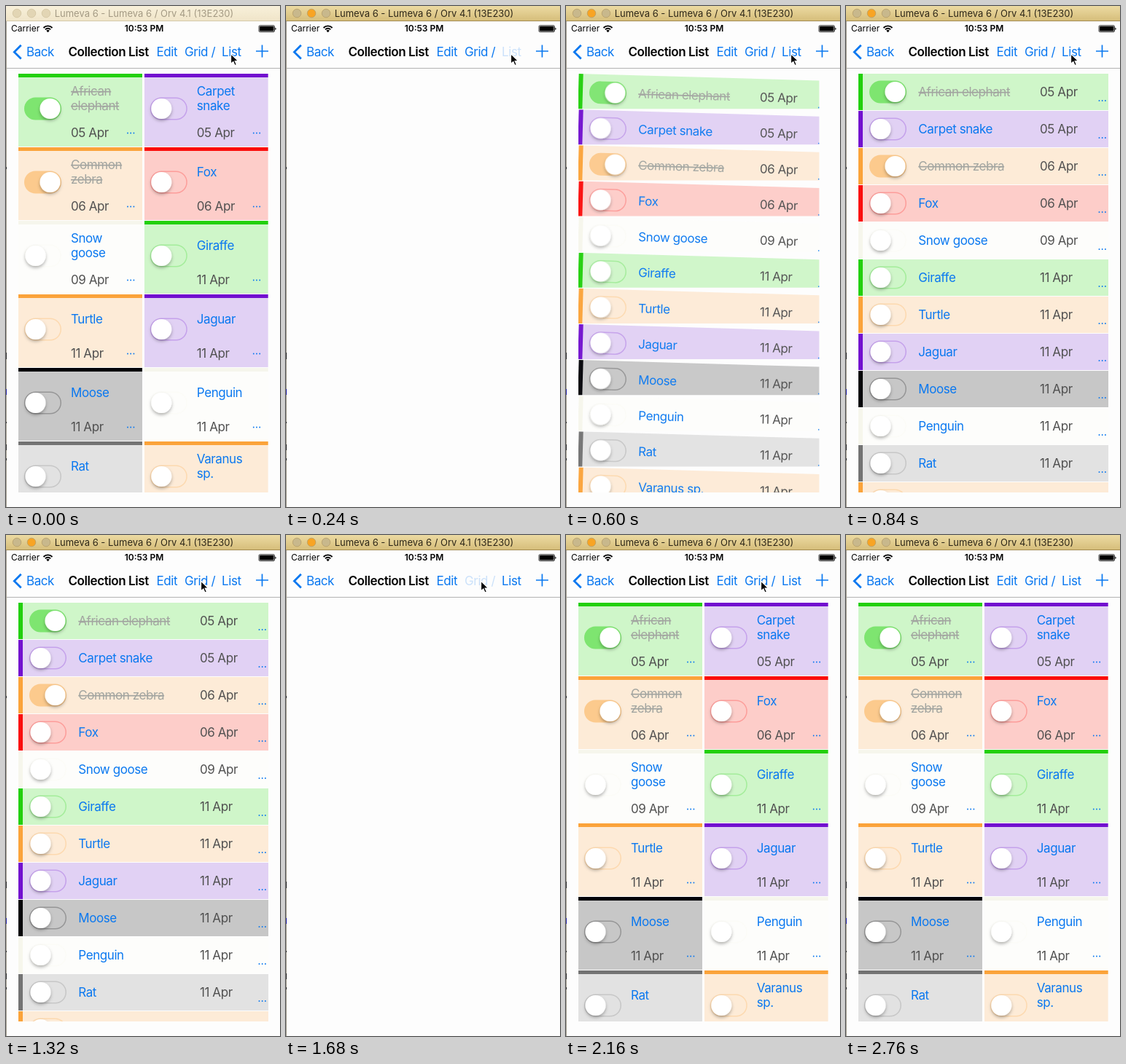
Animation of 376 by 688 pixels, one loop 2880 ms. Source, as an HTML page:

```html
<!DOCTYPE html>
<html lang="en">
<head>
<meta charset="utf-8">
<title>Collection List</title>
<style>
  html, body { margin: 0; width: 100%; height: 100%; overflow: hidden; background: #fdfdfd; }
  svg.stage { display: block; width: 100vw; height: 100vh; }
  text { font: 17px Inter, "Liberation Sans", sans-serif; letter-spacing: -0.42px; white-space: pre; }
  .link { fill: #0a78f0; }
  .date { fill: #505050; }
  .done { fill: #a2a5a0; text-decoration: line-through; }
  .heading { font-weight: 600; fill: #000; }
  .status { font-size: 12px; letter-spacing: 0; }
  .clock { font-weight: 600; text-anchor: middle; }
  .window { font-size: 13px; letter-spacing: 0; text-anchor: middle; }
</style>
</head>
<body>
<svg class="stage" viewBox="0 0 376 688" xmlns="http://www.w3.org/2000/svg">
  <defs>
    <linearGradient id="activeBar" x2="0" y2="1">
      <stop stop-color="#ecdaa2"/><stop offset="1" stop-color="#d6be7b"/>
    </linearGradient>
    <linearGradient id="idleBar" x2="0" y2="1">
      <stop stop-color="#f8f0da"/><stop offset="1" stop-color="#f0e5c9"/>
    </linearGradient>
    <filter id="shadow" x="-40%" y="-40%" width="180%" height="200%">
      <feDropShadow dx="0" dy="2.5" stdDeviation="2" flood-opacity=".3"/>
    </filter>
    <clipPath id="viewport"><rect y="86" width="376" height="582"/></clipPath>
  </defs>

  <rect width="376" height="688" fill="#fdfdfd"/>
  <rect y="20" width="1" height="668" fill="#aaa597"/>
  <g fill="#333">
    <rect y="221" width="1" height="3"/><rect y="476" width="1" height="9"/>
    <rect y="526" width="1" height="8" fill="#2b2bb0"/>
    <rect y="571" width="1" height="2"/><rect y="602" width="1" height="8"/><rect y="621" width="1" height="3"/>
  </g>

  <rect id="bar" width="376" height="20"/>
  <rect id="barEdge" y="20" width="376" height="1"/>
  <g id="lights" stroke-width=".7">
    <circle cx="15" cy="10" r="5.8"/><circle cx="35" cy="10" r="5.8"/><circle cx="55" cy="10" r="5.8"/>
  </g>
  <text id="windowTitle" class="window" x="189.5" y="15">Lumeva 6 - Lumeva 6 / Orv 4.1 (13E230)</text>

  <text class="status" x="7" y="35.3">Carrier</text>
  <g fill="none" stroke="#000" stroke-width="1.9">
    <path d="M51.5 30A8.2 8.2 0 0 1 63.5 30M53.9 32.3A5 5 0 0 1 61.1 32.3"/>
    <path d="M57.5 36.2L55.3 33.8A3.2 3.2 0 0 1 59.7 33.8Z" fill="#000" stroke="none"/>
  </g>
  <text class="status clock" x="189.5" y="35.3">10:53 PM</text>
  <rect x="347" y="26.8" width="21.5" height="8.8" rx="1.5" fill="none" stroke="#000" stroke-width=".8"/>
  <rect x="348" y="27.8" width="19.5" height="6.8" rx=".7"/>
  <path d="M369.4 29.5a1.8 1.8 0 0 1 0 3.4z"/>

  <path d="M20.7 53.8L11.3 63.2L20.7 72.6" fill="none" stroke="#0a78f0" stroke-width="2.8"/>
  <text class="link" x="28" y="69">Back</text>
  <text class="heading" x="85.5" y="69">Collection List</text>
  <text class="link" x="206.5" y="69">Edit</text>
  <text class="link" id="gridButton" x="245" y="69">Grid /</text>
  <text class="link" id="listButton" x="296" y="69">List</text>
  <path d="M343 62H360M351.5 53.5V70.5" stroke="#0a78f0" stroke-width="1.7"/>
  <rect x="1" y="85" width="375" height="1" fill="#b2b2b2"/>

  <g id="views" clip-path="url(#viewport)"></g>
  <path id="cursor" d="M0 0V14L3.3 11.1L5.5 16.2L8 15.2L5.8 10.1H10.1Z" stroke="#fff" stroke-width="1.3"/>
</svg>

<script>
const LOOP = 2880, TICK = 120, LEFT = 17, TOP = 93;
const $ = id => document.getElementById(id);

const colors = {
  green: ['#22d00c', '#cff6c9'], purple: ['#7210cf', '#e1d1f4'],
  orange: ['#fba33a', '#fdebd7'], red: ['#fb0d0c', '#fdcdc9'],
  white: ['#f6f6ec', '#fdfdfb'], black: ['#020207', '#c7c7c7'],
  gray: ['#737373', '#e2e2e2']
};

const animals = [
  ['African elephant', 'green', '05', true], ['Carpet snake', 'purple', '05'],
  ['Common zebra', 'orange', '06', true], ['Fox', 'red', '06'],
  ['Snow goose', 'white', '09'], ['Giraffe', 'green', '11'],
  ['Turtle', 'orange', '11'], ['Jaguar', 'purple', '11'],
  ['Moose', 'black', '11'], ['Penguin', 'white', '11'],
  ['Rat', 'gray', '11'], ['Varanus sp.', 'orange', '11']
];

// The grid bar starts above its cell; the hidden part shows while the cell is tilted.
const layouts = {
  grid: {
    columns: 2, w: 170, h: 100, pitchX: 172.8, pitchY: 101,
    bar: { y: -5, width: 170, height: 10 },
    toggle: [8, 32.5], date: [72, 87], dots: [150, 81.5],
    title: name => {
      const words = name.split(' ');
      return words.map((word, i) => [word, 72, words.length > 1 ? 30 + 20 * i : 40]);
    }
  },
  list: {
    columns: 1, w: 343, h: 50, pitchX: 0, pitchY: 51,
    bar: { width: 6, height: 50 },
    toggle: [15, 9.5], date: [249, 31], dots: [330.5, 37],
    title: name => [[name, 82.3, 31]]
  }
};

function el(parent, tag, attrs, content) {
  const node = document.createElementNS('http://www.w3.org/2000/svg', tag);
  for (const key in attrs) node.setAttribute(key, attrs[key]);
  if (content) node.textContent = content;
  return parent.appendChild(node);
}

function drawToggle(parent, [x, y], color, on) {
  const g = el(parent, 'g', { transform: `translate(${x} ${y})` });
  el(g, 'rect', on
    ? { width: 51, height: 31, rx: 15.5, fill: color, opacity: 0.47 }
    : { x: 0.75, y: 0.75, width: 49.5, height: 29.5, rx: 14.75, fill: 'none',
        stroke: color, 'stroke-width': 1.5, opacity: 0.25 });
  el(g, 'circle', { cx: on ? 35.5 : 15.5, cy: 15.5, r: 14, fill: '#fff', filter: 'url(#shadow)' });
}

function buildView(layout) {
  const root = el($('views'), 'g', {});
  const cells = animals.map(([name, color, day, done]) => {
    const [strong, soft] = colors[color];
    const frame = el(root, 'svg', { overflow: 'hidden' });
    const body = el(frame, 'g', {});
    el(body, 'rect', { width: layout.w, height: layout.h, fill: soft });
    el(body, 'rect', { ...layout.bar, fill: strong });
    drawToggle(body, layout.toggle, strong, done);
    for (const [line, x, y] of layout.title(name))
      el(body, 'text', { x, y, class: done ? 'done' : 'link' }, line);
    el(body, 'text', { x: layout.date[0], y: layout.date[1], class: 'date' }, day + ' Apr');
    for (let i = 0; i < 3; i++)
      el(body, 'circle', { cx: layout.dots[0] + i * 4.2, cy: layout.dots[1], r: 0.95, class: 'link' });
    return { frame, body };
  });

  // Cells grow from the top left while their contents swing upright and fade in.
  return p => {
    root.style.display = p > 0 ? '' : 'none';
    if (p <= 0) return;
    cells.forEach(({ frame, body }, i) => {
      const column = i % layout.columns, row = Math.floor(i / layout.columns);
      frame.setAttribute('x', LEFT + column * layout.pitchX * p);
      frame.setAttribute('y', TOP + row * layout.pitchY * p);
      frame.setAttribute('width', layout.w * p);
      frame.setAttribute('height', layout.h * p);
      body.setAttribute('transform', `rotate(${45 * (1 - p)} 0 ${layout.h * p / 2})`);
      body.setAttribute('opacity', p);
    });
  };
}

const showGrid = buildView(layouts.grid);
const showList = buildView(layouts.list);

const clamp = v => Math.min(1, Math.max(0, v));
const easeOut = v => 1 - (1 - clamp(v)) ** 3;
const entrance = (t, start) => easeOut((t - start) / 473);

function buttonAlpha(t, pressed) {
  const d = t - pressed;
  if (d < 0 || d >= 360) return 1;
  return d < 240 ? 0.2 : 0.6;
}

const cursorPath = [
  [0, 308.5, 65.5], [960, 308.5, 65.5], [1080, 302, 65], [1200, 279, 64], [1320, 267.5, 63],
  [2160, 267.5, 63], [2280, 272, 45], [2400, 282, 15], [2520, 290, -30], [LOOP, 290, -30]
];

function cursorAt(t) {
  const i = cursorPath.findIndex(point => point[0] > t);
  const [t0, x0, y0] = cursorPath[i - 1], [t1, x1, y1] = cursorPath[i];
  const k = (t - t0) / (t1 - t0);
  return [x0 + (x1 - x0) * k, y0 + (y1 - y0) * k];
}

function drawWindowBar(active) {
  $('bar').setAttribute('fill', active ? 'url(#activeBar)' : 'url(#idleBar)');
  $('barEdge').setAttribute('fill', active ? '#a48d55' : '#d5c9aa');
  $('windowTitle').setAttribute('fill', active ? '#2e2718' : '#a49a84');
  const fills = active ? ['#c8b88c', '#f8a423', '#c8b88c'] : Array(3).fill('#e2d5b4');
  [...$('lights').children].forEach((light, i) => light.setAttribute('fill', fills[i]));
  $('lights').setAttribute('stroke', active ? '#b09a66' : '#cfc19c');
}

function render(time) {
  const t = Math.floor(time % LOOP / TICK) * TICK;
  const listMode = t >= 240 && t < 1680;
  drawWindowBar(t >= 120);
  showGrid(listMode ? 0 : t < 240 ? 1 : entrance(t, 1680));
  showList(listMode ? entrance(t, 284) : 0);
  $('listButton').setAttribute('opacity', buttonAlpha(t, 120));
  $('gridButton').setAttribute('opacity', buttonAlpha(t, 1560));
  $('cursor').setAttribute('transform', `translate(${cursorAt(t)})`);
}

const start = performance.now();
function loop() {
  render(performance.now() - start);
  requestAnimationFrame(loop);
}
loop();
</script>
</body>
</html>
```
